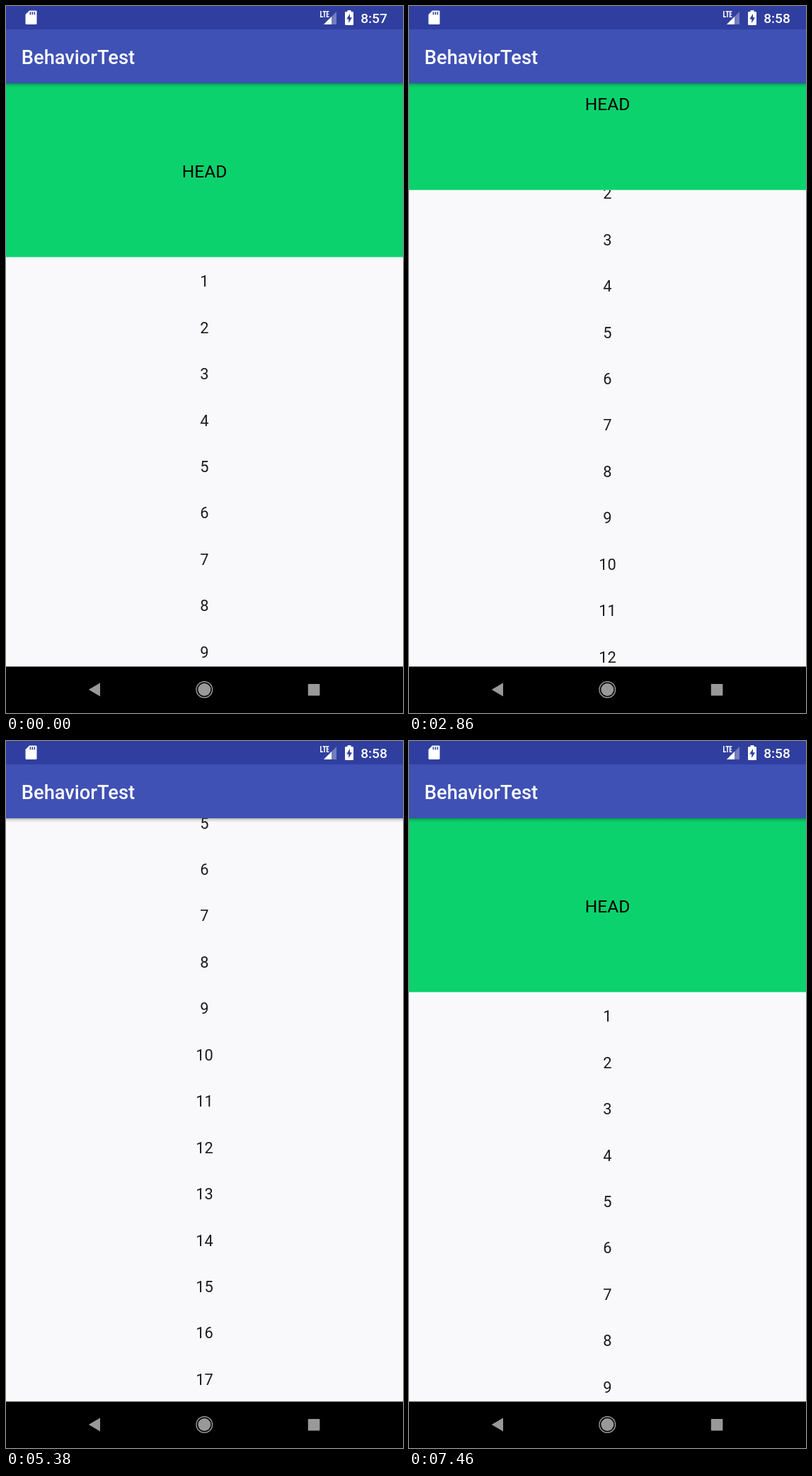
Write an HTML page with a canvas that moves like this. It is 561x998 px and loops after 8000 ms.

```html
<!DOCTYPE html>
<html lang="en">
<head>
<meta charset="utf-8">
<title>BehaviorTest</title>
<style>
  html, body { margin: 0; width: 100%; height: 100%; overflow: hidden; background: #000; }
  canvas { display: block; width: 561px; height: 998px; }
</style>
</head>
<body>
<canvas id="stage"></canvas>
<script>
const W = 561, H = 998, LOOP = 8000, STEP = 41;
const DP = W / 411.43;
const STATUS_H = 33, BAR_BOTTOM = 109, NAV_TOP = 932.6;
const HEAD_H = 180 * DP, ROW_H = 48 * DP;
const CLOCK_TICK = 1490;
const FONT = 'Roboto, "Noto Sans", sans-serif';

// Drag gestures as [ms, list displacement in px]
const DRAGS = [
  [[1870, 0], [2690, 163], [2860, 189.5], [3610, 371.5], [4350, 530], [4430, 534.5]],
  [[5340, 534.5], [5380, 534.5], [6215, 348], [6670, 235.8], [7040, 104], [7460, 0]]
];

const canvas = document.getElementById('stage');
const dpr = window.devicePixelRatio || 1;
canvas.width = Math.round(W * dpr);
canvas.height = Math.round(H * dpr);
const ctx = canvas.getContext('2d');
ctx.scale(dpr, dpr);

function slope(pts, i) {
  if (i === 0 || i === pts.length - 1) return 0;
  const a = (pts[i][1] - pts[i - 1][1]) / (pts[i][0] - pts[i - 1][0]);
  const b = (pts[i + 1][1] - pts[i][1]) / (pts[i + 1][0] - pts[i][0]);
  return a * b > 0 ? 2 * a * b / (a + b) : 0;
}

// Monotone cubic through the points, held between screen refreshes
function follow(pts, t) {
  const last = pts.length - 1;
  if (t <= pts[0][0]) return pts[0][1];
  if (t >= pts[last][0]) return pts[last][1];
  let i = 0;
  while (t >= pts[i + 1][0]) i++;
  const [t0, p0] = pts[i], [t1, p1] = pts[i + 1];
  const span = t1 - t0;
  const u = Math.floor((t - t0) / STEP) * STEP / span;
  const v = 1 - u;
  return p0 * (1 + 2 * u) * v * v + slope(pts, i) * span * u * v * v
       + p1 * u * u * (3 - 2 * u) - slope(pts, i + 1) * span * u * u * v;
}

function rect(x, y, w, h, color) {
  ctx.fillStyle = color;
  ctx.fillRect(x, y, w, h);
}

function poly(color, ...pts) {
  ctx.fillStyle = color;
  ctx.beginPath();
  pts.forEach(([x, y]) => ctx.lineTo(x, y));
  ctx.closePath();
  ctx.fill();
}

function text(str, x, y, size, color, align = 'center', weight = 400) {
  ctx.font = `${weight} ${size}px ${FONT}`;
  ctx.textAlign = align;
  ctx.fillStyle = color;
  ctx.fillText(str, x, y);
}

function drawContent(shift) {
  const headY = BAR_BOTTOM - Math.min(shift / 2, HEAD_H);
  const listY = headY + HEAD_H;
  rect(0, BAR_BOTTOM, W, NAV_TOP - BAR_BOTTOM, '#f9f9fb');

  ctx.save();
  ctx.beginPath();
  ctx.rect(0, listY, W, NAV_TOP - listY);
  ctx.clip();
  const first = BAR_BOTTOM + HEAD_H - shift;
  for (let n = 1; n <= 20; n++) {
    const top = first + (n - 1) * ROW_H;
    if (top + ROW_H > listY && top < NAV_TOP) {
      text(n, W / 2, top + 41.8, 16 * DP, '#1c1c1c');
    }
  }
  ctx.restore();

  if (listY > BAR_BOTTOM) {
    rect(0, headY, W, HEAD_H, '#0bd26c');
    text('HEAD', W / 2, headY + 132.6, 18 * DP, '#000');
  }
}

function drawStatus(clock) {
  const bar = '#303f9f', white = '#fff';
  rect(0, 0, W, STATUS_H, bar);

  // Memory card
  poly(white, [33, 6.5], [42.5, 6.5], [43.5, 7.5], [43.5, 25], [42.5, 26],
    [28.5, 26], [27.5, 25], [27.5, 12]);
  for (let i = 0; i < 3; i++) rect(33.6 + i * 3, 8.3, 1.6, 4, bar);

  // Signal strength
  poly('rgba(255,255,255,.32)', [467, 8], [467, 26], [449, 26]);
  poly(white, [460, 15], [460, 26], [449, 26]);
  rect(442, 5, 15.5, 12.5, bar);
  ctx.strokeStyle = white;
  ctx.lineWidth = 1.5;
  ctx.stroke(new Path2D(
    'M444.8 7V15.3H448M447.6 7.8H452.4M450 7V16M456.4 7.8H453.6V15.3H456.4M453.6 11.4H456'));

  // Charging battery
  rect(482.5, 6, 5, 3, white);
  ctx.fillStyle = white;
  ctx.beginPath();
  ctx.roundRect(479, 8, 12, 19, 1.2);
  ctx.fill();
  poly(bar, [486, 11], [486, 16.2], [489, 16.2], [484.2, 24], [484.2, 18.6], [481.2, 18.6]);

  text(clock, 501.2, 23.8, 14 * DP, white, 'left', 500);
}

function drawToolbar() {
  const shade = ctx.createLinearGradient(0, BAR_BOTTOM, 0, BAR_BOTTOM + 6);
  shade.addColorStop(0, 'rgba(0,0,0,.3)');
  shade.addColorStop(0.4, 'rgba(0,0,0,.12)');
  shade.addColorStop(1, 'rgba(0,0,0,0)');
  rect(0, BAR_BOTTOM, W, 6, shade);
  rect(0, STATUS_H, W, BAR_BOTTOM - STATUS_H, '#3f51b5');
  text('BehaviorTest', 16 * DP, 81.6, 20 * DP, '#fff', 'left', 500);
}

function drawNav() {
  const gray = '#999';
  rect(0, NAV_TOP, W, H - NAV_TOP, '#000');
  poly(gray, [116.8, 965], [133, 955.5], [133, 974.5]);
  ctx.beginPath();
  ctx.arc(280.3, 965, 11.3, 0, Math.PI * 2);
  ctx.strokeStyle = gray;
  ctx.lineWidth = 1.4;
  ctx.stroke();
  ctx.beginPath();
  ctx.arc(280.3, 965, 9, 0, Math.PI * 2);
  ctx.fillStyle = gray;
  ctx.fill();
  ctx.beginPath();
  ctx.roundRect(426.8, 957, 16.6, 16.4, 1);
  ctx.fill();
}

function draw(t) {
  const drag = t < DRAGS[1][0][0] ? DRAGS[0] : DRAGS[1];
  drawContent(follow(drag, t));
  drawToolbar();
  drawStatus(t < CLOCK_TICK ? '8:57' : '8:58');
  drawNav();
}

const start = performance.now();
function tick() {
  draw((performance.now() - start) % LOOP);
  requestAnimationFrame(tick);
}
tick();
</script>
</body>
</html>
```
